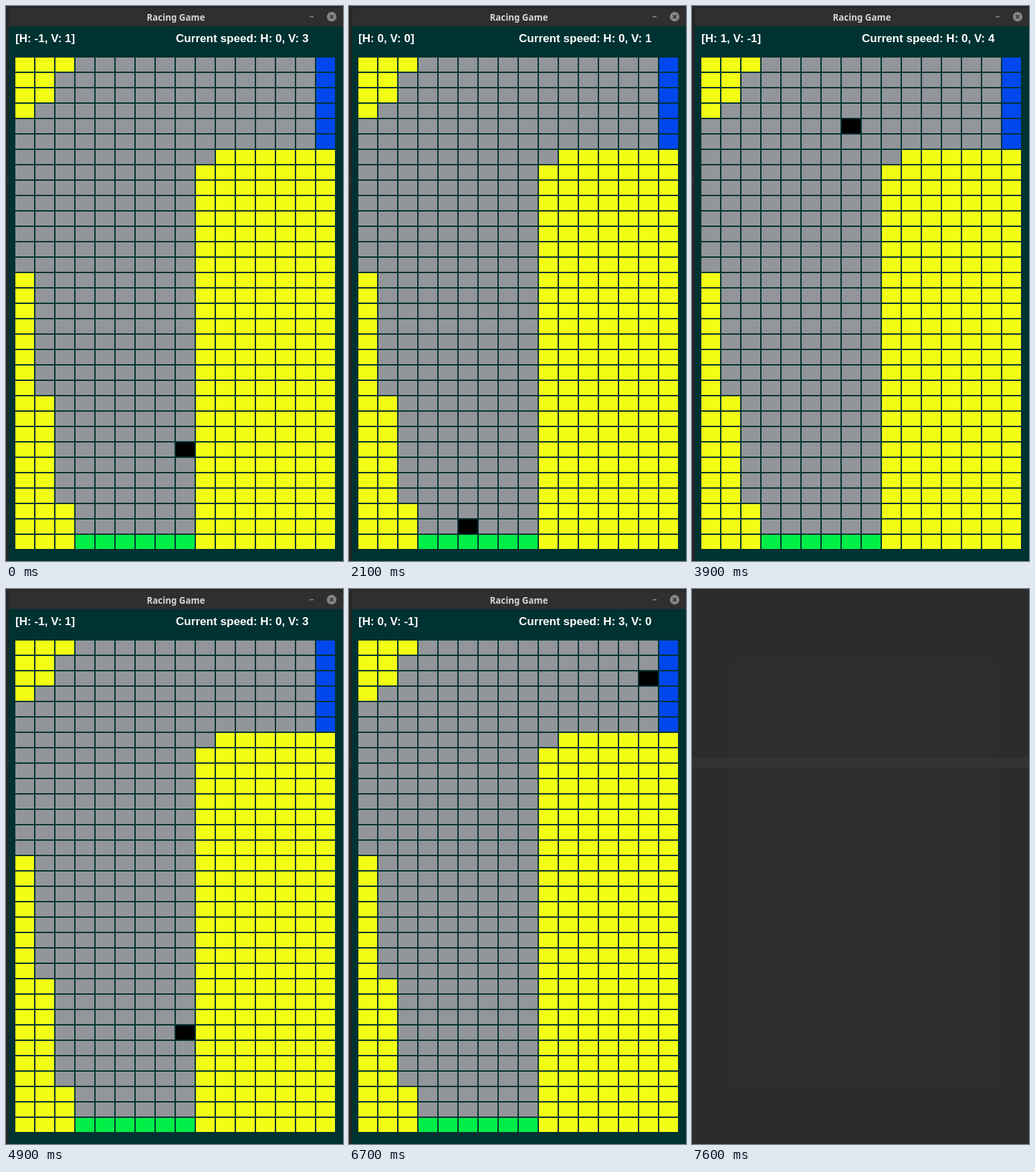
An HTML page that plays this animation: 504x829 px, repeating every 7.7 s.

```html
<!DOCTYPE html>
<html lang="en">
<head>
<meta charset="utf-8">
<title>Racing Game</title>
<style>
  html, body { margin: 0; width: 100%; height: 100%; overflow: hidden; background: #2c2c2c; }
  svg { display: block; }
  .title { font: 700 13.33px "Noto Sans", "Open Sans", sans-serif; fill: #d6d6d6; }
  .info { font: 700 17.1px "Liberation Sans", Arial, sans-serif; fill: #fff; }
  .frame { filter: drop-shadow(0 1px 3px #0007); }
</style>
</head>
<body>
<svg width="504" height="829" viewBox="0 0 504 829">
  <rect width="504" height="829" fill="#2c2c2c"/>
  <rect y="252" width="504" height="15" fill="#333"/>
  <rect id="ghost" x="55" y="107" width="400" height="640" fill="#fff" opacity=".005"/>
  <g id="window">
    <path class="frame" d="M4 831V8q0-5 5-5H499q5 0 5 5V831z" fill="#2f2f2f"/>
    <text class="title" x="254" y="22" text-anchor="middle">Racing Game</text>
    <path d="M454 16h6" stroke="#8a8a8a" stroke-width="1.5"/>
    <circle cx="487" cy="16" r="7.2" fill="#868686"/>
    <path d="M484.5 13.5l5 5m0-5l-5 5" stroke="#2f2f2f" stroke-width="1.6"/>
    <rect id="body" x="4" y="30" width="500" height="801" fill="#003232"/>
    <g id="game">
      <text id="action" class="info" x="14" y="54"></text>
      <text id="speed" class="info" x="254" y="54"></text>
      <g id="track"></g>
      <rect id="car" width="28" height="21" fill="#000"/>
    </g>
  </g>
</svg>
<script>
const COLS = 16, ROWS = 32, LOOP = 7700, CLOSE = 7500, GONE = 7600;
const $ = id => document.getElementById(id);
const cellX = col => 14 + 30 * col;
const cellY = row => 77 + 23 * row;

// Number of sand cells at the left edge of a row
function leftSand(row) {
  if (row < 4) return [3, 2, 2, 1][row];
  return (row >= 14) + (row >= 22) + (row >= 29);
}

function cellColor(col, row) {
  const rightSand = row < 6 ? COLS : row === 6 ? 10 : 9;
  if (col < leftSand(row) || col >= rightSand) return '#f2fe14';
  if (row < 6 && col === COLS - 1) return '#0048ee';
  if (row === ROWS - 1) return '#00ee48';
  return '#929599';
}

function drawTrack() {
  let cells = '';
  for (let row = 0; row < ROWS; row++)
    for (let col = 0; col < COLS; col++)
      cells += `<rect x="${cellX(col)}" y="${cellY(row)}" width="28" height="21" fill="${cellColor(col, row)}"/>`;
  $('track').innerHTML = cells;
}

const clampSpeed = v => Math.max(0, Math.min(4, v));

// Each state shows the action about to be taken, which then changes the speed
function drive(col, row, h, v, actions) {
  return actions.map(([ah, av]) => {
    const state = { col, row, h, v, ah, av };
    h = clampSpeed(h + ah);
    v = clampSpeed(v + av);
    col += h;
    row -= v;
    return state;
  });
}

const toFinish = [[-1, 1], [0, 0], [-1, 0], [0, 0], [-1, -1], [0, -1], [1, -1], [1, 0], [1, -1], [0, -1]];
const overshoot = [[0, 1], [0, 0], [1, 0], [0, 1], [-1, 1], [0, 0], [-1, 1], [0, 0], [0, 0], [0, 0], [1, -1], [1, -1]];
const states = [
  ...drive(8, 25, 0, 3, toFinish),
  ...drive(5, 31, 0, 0, overshoot),
  ...drive(7, 31, 0, 0, [[0, 1], [1, 1], [-1, 1], ...toFinish])
];
const times = [0, 100, 200, 500, 600, ...Array.from({ length: 28 }, (_, i) => 900 + 200 * i), 6600, 6700];

function render(t) {
  const closing = t >= CLOSE, gone = t >= GONE;
  const win = $('window');
  win.style.display = gone ? 'none' : '';
  $('ghost').style.display = gone ? '' : 'none';
  $('game').style.display = closing ? 'none' : '';
  win.setAttribute('opacity', closing ? 0.5 : 1);
  win.setAttribute('transform', closing ? 'translate(254 416) scale(.88) translate(-254 -416)' : '');
  $('body').setAttribute('fill', closing ? '#b6b6b6' : '#003232');
  if (closing) return;

  const s = states[times.findLastIndex(start => start <= t)];
  $('action').textContent = `[H: ${s.ah}, V: ${s.av}]`;
  $('speed').textContent = `Current speed: H: ${s.h}, V: ${s.v}`;
  $('car').setAttribute('x', cellX(s.col));
  $('car').setAttribute('y', cellY(s.row));
}

drawTrack();
render(0);
const begin = performance.now();
function tick() {
  render((performance.now() - begin) % LOOP);
  requestAnimationFrame(tick);
}
requestAnimationFrame(tick);
</script>
</body>
</html>
```
